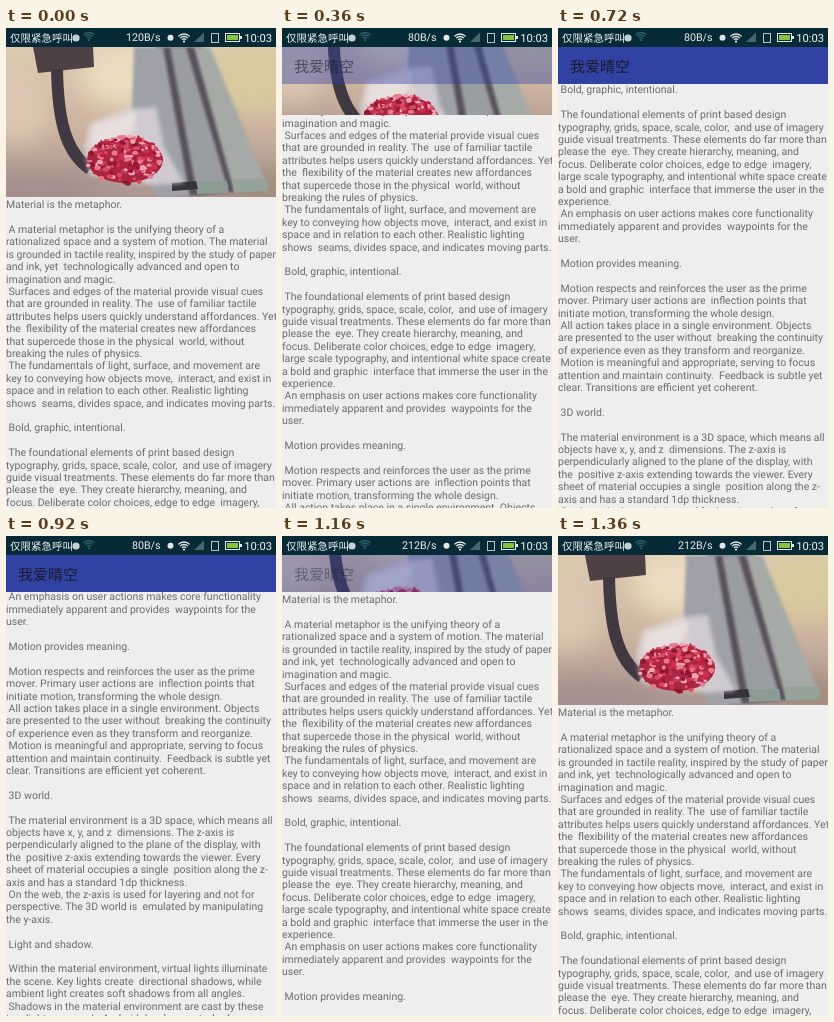
Write an HTML page with a canvas that moves like this. It is 270 px wide and 480 px high and loops after 1.4 s.

```html
<!DOCTYPE html>
<html lang="en">
<head>
<meta charset="utf-8">
<title>Collapsing header</title>
<style>
html, body { margin: 0; width: 100%; height: 100%; overflow: hidden; background: #eee; }
canvas { display: block; width: 270px; height: 480px; }
</style>
</head>
<body>
<canvas id="stage" width="270" height="480"></canvas>
<script>
const W = 270, H = 480, LOOP = 1400, STEP = 40;
const STATUS_H = 19, BAR_BOTTOM = 56, HEADER_BOTTOM = 169, LINE_H = 12.4;
const LATIN = 'Roboto, sans-serif';
const CJK = '"Noto Sans CJK SC", "Noto Sans CJK", sans-serif';
const ctx = document.getElementById('stage').getContext('2d');

const lines = `Material is the metaphor.

 A material metaphor is the unifying theory of a
rationalized space and a system of motion. The material
is grounded in tactile reality, inspired by the study of paper
and ink, yet  technologically advanced and open to
imagination and magic.
 Surfaces and edges of the material provide visual cues
that are grounded in reality. The  use of familiar tactile
attributes helps users quickly understand affordances. Yet
the  flexibility of the material creates new affordances
that supercede those in the physical  world, without
breaking the rules of physics.
 The fundamentals of light, surface, and movement are
key to conveying how objects move,  interact, and exist in
space and in relation to each other. Realistic lighting
shows  seams, divides space, and indicates moving parts.

 Bold, graphic, intentional.

 The foundational elements of print based design
typography, grids, space, scale, color,  and use of imagery
guide visual treatments. These elements do far more than
please the  eye. They create hierarchy, meaning, and
focus. Deliberate color choices, edge to edge  imagery,
large scale typography, and intentional white space create
a bold and graphic  interface that immerse the user in the
experience.
 An emphasis on user actions makes core functionality
immediately apparent and provides  waypoints for the
user.

 Motion provides meaning.

 Motion respects and reinforces the user as the prime
mover. Primary user actions are  inflection points that
initiate motion, transforming the whole design.
 All action takes place in a single environment. Objects
are presented to the user without  breaking the continuity
of experience even as they transform and reorganize.
 Motion is meaningful and appropriate, serving to focus
attention and maintain continuity.  Feedback is subtle yet
clear. Transitions are efficient yet coherent.

 3D world.

 The material environment is a 3D space, which means all
objects have x, y, and z  dimensions. The z-axis is
perpendicularly aligned to the plane of the display, with
the  positive z-axis extending towards the viewer. Every
sheet of material occupies a single  position along the z-
axis and has a standard 1dp thickness.
 On the web, the z-axis is used for layering and not for
perspective. The 3D world is  emulated by manipulating
the y-axis.

 Light and shadow.

 Within the material environment, virtual lights illuminate
the scene. Key lights create  directional shadows, while
ambient light creates soft shadows from all angles.
 Shadows in the material environment are cast by these
two light sources. In Android development, shadows`.split('\n');

// Each track is a list of [time, value] points joined by straight lines.
const collapse = [[0, 0], [200, 50], [360, 82], [520, 113], [1160, 113], [1340, 0]];
const scroll = [[0, 0], [200, 47], [360, 74], [560, 105], [880, 345], [920, 350], [1120, 0]];
const scrim = [[0, 0], [200, .22], [360, .42], [560, .78], [720, 1], [1000, 1], [1160, .38], [1280, 0]];
const titleAlpha = [[0, 0], [120, 0], [200, .18], [360, .6], [560, .85], [720, 1], [1000, 1], [1160, .42], [1240, 0]];
const titleGrow = [[0, 1], [200, 1], [360, 0]];

function at(track, t) {
  const i = track.findIndex(p => p[0] > t);
  if (i < 0) return track[track.length - 1][1];
  const [t0, a] = track[i - 1], [t1, b] = track[i];
  return a + (b - a) * (t - t0) / (t1 - t0);
}

function poly(c, color, ...pts) {
  c.fillStyle = color;
  c.beginPath();
  for (let i = 0; i < pts.length; i += 2) c.lineTo(pts[i], pts[i + 1]);
  c.closePath();
  c.fill();
}

function disc(c, color, x, y, rx, ry = rx) {
  c.fillStyle = color;
  c.beginPath();
  c.ellipse(x, y, rx, ry, 0, 0, Math.PI * 2);
  c.fill();
}

function label(text, x, y, font, color, align = 'left') {
  ctx.font = font;
  ctx.fillStyle = color;
  ctx.textAlign = align;
  ctx.fillText(text, x, y);
}

function paintPhoto() {
  const photo = document.createElement('canvas');
  photo.width = W;
  photo.height = 150;
  const c = photo.getContext('2d');
  const sky = c.createLinearGradient(0, 0, 0, 150);
  sky.addColorStop(0, '#dccbb0');
  sky.addColorStop(.5, '#cdb5a0');
  sky.addColorStop(1, '#ab9691');
  c.fillStyle = sky;
  c.fillRect(0, 0, W, 150);

  c.filter = 'blur(12px)';
  disc(c, '#ecdcc0', 115, 28, 40, 32);
  disc(c, '#d8ca9c', 250, 32, 45, 32);
  disc(c, '#dbc7b1', 10, 58, 34, 38);
  disc(c, '#a58f8c', 30, 146, 70, 22);
  disc(c, '#a18d7c', 255, 142, 38, 20);

  c.filter = 'blur(1.5px)';
  poly(c, '#58505a', 150, 0, 196, 0, 258, 142, 172, 150);
  poly(c, '#a0a1a8', 128, 0, 157, 0, 184, 150, 150, 150, 126, 60);
  poly(c, '#9a9da1', 164, 0, 180, 0, 222, 142, 190, 142);
  poly(c, '#a6aaa6', 188, 0, 204, 0, 262, 140, 228, 144);

  c.filter = 'blur(.7px)';
  poly(c, '#8d9b95', 190, 134, 221, 134, 223, 146, 191, 147);
  poly(c, '#95a39a', 226, 132, 260, 131, 262, 144, 228, 146);
  poly(c, '#37333b', 166, 136, 190, 134, 192, 142, 166, 144);

  poly(c, '#4d4143', 27, 0, 87, 0, 88, 20, 32, 26);
  c.strokeStyle = '#413942';
  c.lineWidth = 12;
  c.beginPath();
  c.moveTo(51, 22);
  c.bezierCurveTo(52, 70, 58, 104, 84, 122);
  c.stroke();

  c.filter = 'blur(2px)';
  poly(c, 'rgba(225,220,224,.72)', 84, 76, 120, 62, 150, 60, 158, 100, 178, 136, 148, 138, 84, 128, 78, 100);
  poly(c, 'rgba(245,240,238,.5)', 88, 78, 132, 66, 122, 92, 84, 98);
  c.filter = 'none';

  let seed = 7;
  const random = () => (seed = seed * 16807 % 2147483647) / 2147483647;
  const petals = ['#b9213f', '#d84a66', '#e87a8d', '#8f1730', '#cc3150', '#f0a4ae'];
  disc(c, '#a92541', 119, 113, 38, 23);
  for (let i = 0; i < 210; i++) {
    const a = random() * Math.PI * 2, r = Math.sqrt(random());
    disc(c, petals[i % petals.length], 119 + 38 * r * Math.cos(a), 113 + 24 * r * Math.sin(a),
      1.2 + random() * 2.2, 1 + random() * 1.6);
  }
  return photo;
}

function drawArticle(top) {
  lines.forEach((line, i) => {
    const y = top + i * LINE_H;
    if (y > 0 && y < H + 12) label(line, 0, y + 3.8, '10.5px ' + LATIN, '#6c6c6c');
  });
}

function drawHeader(t, offset) {
  const bottom = HEADER_BOTTOM - offset;
  ctx.save();
  ctx.beginPath();
  ctx.rect(0, STATUS_H, W, bottom - STATUS_H);
  ctx.clip();
  ctx.drawImage(photo, 0, STATUS_H - offset / 2);
  ctx.globalAlpha = at(scrim, t);
  ctx.fillStyle = '#3142a4';
  ctx.fillRect(0, STATUS_H, W, BAR_BOTTOM - STATUS_H);
  ctx.globalAlpha = at(titleAlpha, t);
  const grow = at(titleGrow, t);
  label('我爱晴空', 12 - 8 * grow, 43.5 + 3 * grow, `${15 + 2 * grow}px ${CJK}`, '#1b1d2c');
  ctx.restore();
}

function drawWifi(x, y, color) {
  ctx.strokeStyle = color;
  ctx.lineWidth = 1.3;
  for (const r of [3, 5.5, 8]) {
    ctx.beginPath();
    ctx.arc(x, y, r, -Math.PI * .75, -Math.PI * .25);
    ctx.stroke();
  }
  disc(ctx, color, x, y - .4, 1.1);
}

function drawStatus(t) {
  ctx.fillStyle = '#062b36';
  ctx.fillRect(0, 0, W, STATUS_H);
  const speed = t < 280 ? 120 : t < 1040 ? 80 : 212;
  label('仅限紧急呼叫', 4, 13.5, '10.5px ' + CJK, '#f2f5f5');
  disc(ctx, '#c5d0d2', 70, 10, 3.6);
  drawWifi(83, 12.5, '#2f626b');
  label(speed + 'B/s', 154.5, 13.3, '10.7px ' + LATIN, '#e9eeee', 'right');
  disc(ctx, '#dfe7e8', 164.5, 9.7, 3);
  drawWifi(178, 14, '#e8eeee');
  poly(ctx, '#48666d', 188, 14, 198, 14, 198, 4.5);
  ctx.strokeStyle = '#b7c4c6';
  ctx.lineWidth = 1;
  ctx.strokeRect(205.5, 5.5, 7, 9);
  ctx.strokeStyle = '#e4eaea';
  ctx.strokeRect(219.5, 5.5, 14, 8);
  ctx.fillStyle = '#e4eaea';
  ctx.fillRect(234, 8, 2, 3);
  ctx.fillStyle = '#86c440';
  ctx.fillRect(221, 7, 11, 5);
  label('10:03', 266, 13.6, '11.2px ' + LATIN, '#f2f5f5', 'right');
}

function frame(now) {
  const t = Math.floor(now % LOOP / STEP) * STEP;
  const offset = at(collapse, t);
  ctx.fillStyle = '#eee';
  ctx.fillRect(0, 0, W, H);
  drawArticle(HEADER_BOTTOM + 7.3 - offset - at(scroll, t));
  drawHeader(t, offset);
  drawStatus(t);
  requestAnimationFrame(frame);
}

const photo = paintPhoto();
ctx.textRendering = 'geometricPrecision';
requestAnimationFrame(frame);
</script>
</body>
</html>
```
